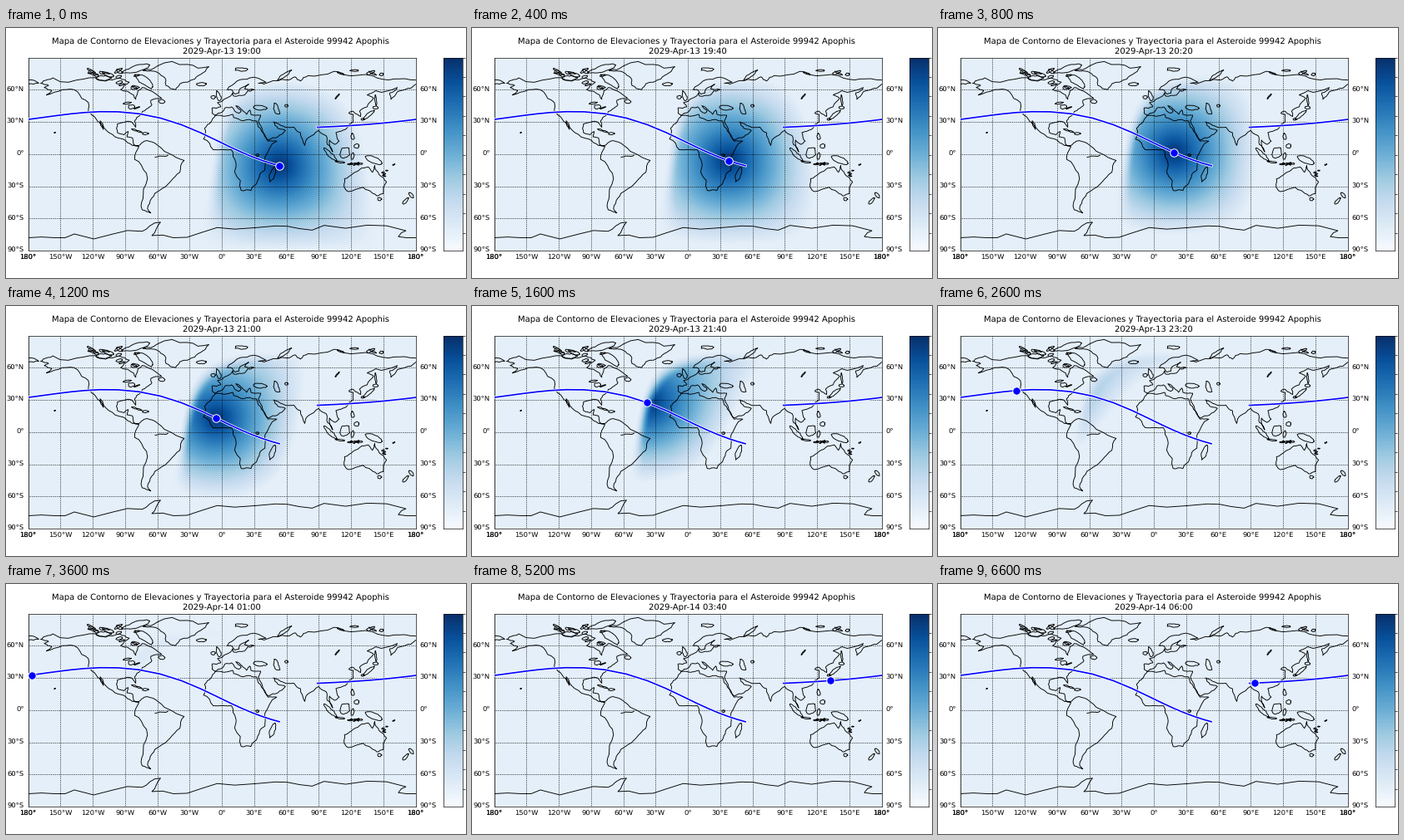
Recreate the animation shown at these times as a matplotlib script. Size 552 px wide and 301 px high, loop 6800 ms.

```python
import numpy as np
import matplotlib.pyplot as plt
from matplotlib.animation import FuncAnimation

W, H, DPI = 552, 301, 60
FRAMES, INTERVAL = 34, 200
CLOSEST = 2.77      # hours after 19:00
TILT = np.radians(39.6)
SUN_DECL = 9.2
BASE = 0.09         # shade where nothing is visible

plt.rcParams.update({"font.family": "DejaVu Sans", "text.hinting": "no_hinting"})
rng = np.random.default_rng(4)
fig = plt.figure(figsize=(W / DPI, H / DPI), dpi=DPI, facecolor="white")


def pixel_axes(left, top, right, bottom):
    axes = fig.add_axes([left / W, 1 - bottom / H,
                         (right - left) / W, (bottom - top) / H])
    axes.set_xticks([])
    axes.set_yticks([])
    return axes


ax = pixel_axes(26.5, 35.5, 491.5, 268)


def shore(*points, rounds=2):
    """Draw a coast through key points, crinkled by midpoint displacement."""
    p = np.array(points, float)
    for _ in range(rounds):
        step = np.diff(p, axis=0)
        middle = p[:-1] + step / 2
        middle += rng.uniform(-0.13, 0.13, (len(step), 1)) * step[:, ::-1] * [1, -1]
        p = np.insert(p, np.arange(1, len(p)), middle, axis=0)
    ax.plot(*p.T, color="black", lw=1.1, zorder=3)


def island(lon, lat, length, width, angle=0):
    """Draw a ragged ellipse."""
    a = np.linspace(0, 2 * np.pi, 11)
    r = rng.uniform(0.8, 1.15, 11) / 2
    r[-1] = r[0]
    x, y = length * r * np.cos(a), width * r * np.sin(a)
    c, s = np.cos(np.radians(angle)), np.sin(np.radians(angle))
    shore(*zip(lon + c * x - s * y, lat + s * x + c * y), rounds=1)


def islets(count, lons, lats, size):
    for _ in range(count):
        island(rng.uniform(*lons), rng.uniform(*lats),
               size * rng.uniform(0.6, 1.4), size * rng.uniform(0.2, 0.5),
               rng.uniform(-30, 30))


# Americas, clockwise from the Bering Strait
shore((-168, 66), (-166, 68), (-157, 71), (-128, 70), (-108, 68), (-95, 71),
      (-86, 67), (-94, 60), (-82, 55), (-80, 51), (-78, 59), (-74, 62), (-66, 59),
      (-56, 52), (-66, 50), (-65, 46), (-70, 42), (-76, 36), (-81, 31), (-80, 25),
      (-84, 30), (-97, 28), (-97, 20), (-91, 18), (-87, 21), (-88, 16), (-83, 15),
      (-82, 9), (-77, 8), (-72, 12), (-62, 10), (-50, 1), (-35, -6), (-39, -17),
      (-48, -26), (-58, -34), (-65, -41), (-69, -51), (-66, -55), (-74, -52),
      (-73, -38), (-70, -18), (-81, -5), (-77, 7), (-83, 8), (-92, 14), (-105, 20),
      (-113, 31), (-110, 23), (-117, 33), (-124, 40), (-124, 48), (-134, 58),
      (-148, 60), (-163, 55), (-158, 59), (-165, 62), (-161, 64), (-168, 66))
shore((-50, -1), (-56, -2), (-62, -3))
shore((-73, 78), (-60, 82), (-32, 83.5), (-12, 81.5), (-20, 74), (-25, 70),
      (-39, 65.5), (-43, 60), (-52, 64), (-52, 69), (-58, 75), (-73, 78))
# Africa
shore((-6, 36), (10, 37), (11, 34), (20, 31), (32, 31), (37, 21), (43, 12),
      (51, 12), (40, -3), (40, -15), (35, -20), (32, -28), (27, -34), (18, -34),
      (12, -17), (13, -8), (9, 4), (-8, 4), (-17, 14), (-16, 24), (-10, 30), (-6, 36))
# Europe and the Siberian coast
shore((36, 36), (27, 37), (26, 41), (23, 37), (19, 41), (13, 45), (18, 40),
      (16, 38), (9, 44), (3, 43), (0, 39), (-6, 36), (-9, 38), (-9, 43), (-1, 44),
      (-4, 48), (4, 52), (8, 54), (10, 57), (11, 54), (21, 55), (24, 59), (30, 60),
      (21, 61), (25, 65), (17, 61), (16, 57), (12, 56), (10, 59), (5, 60), (14, 68),
      (26, 71), (41, 67), (34, 66), (44, 67), (60, 69), (68, 72), (73, 68), (80, 73),
      (104, 77), (113, 74), (140, 73), (160, 70), (180, 69))
shore((-180, 69), (-170, 66), (-180, 65))
# Asia from the Pacific to the Mediterranean
shore((180, 65), (170, 60), (163, 58), (157, 51), (156, 57), (163, 62), (143, 59),
      (135, 55), (141, 52), (135, 44), (128, 40), (129, 35), (126, 37), (121, 40),
      (118, 38), (122, 37), (122, 30), (115, 23), (106, 20), (109, 12), (105, 9),
      (100, 13), (103, 2), (98, 9), (97, 17), (90, 22), (80, 15), (77, 8), (73, 20),
      (67, 25), (57, 26), (48, 30), (52, 24), (59, 22), (52, 16), (43, 13), (35, 28),
      (34, 31), (36, 36))
# Australia and Antarctica
shore((142, -11), (146, -19), (153, -26), (150, -37), (144, -39), (137, -34),
      (131, -31), (118, -35), (115, -33), (114, -23), (122, -18), (130, -13),
      (136, -12), (140, -17), (142, -11))
shore((-180, -78), (-155, -78), (-137, -74.5), (-101, -74.5), (-74, -72), (-67, -67),
      (-57, -63.5), (-61, -70), (-65, -76), (-45, -78), (-20, -73.5), (12, -70),
      (50, -67), (72, -69.5), (95, -66.5), (135, -66.3), (171, -71.5), (164, -77),
      (180, -78), rounds=1)

# Islands and lakes: centre, length, width, tilt
for place in [
        (-72, 68, 22, 7, -35), (-110, 71, 14, 5), (-80, 79.5, 26, 6, 15),
        (-56, 49, 6, 4), (-79, 21.7, 11, 1.5, -18), (-71, 19, 6, 2),
        (-19, 65, 10, 3), (-3, 54, 9, 4, 110), (-8, 53, 4, 3), (18, 79, 12, 3),
        (58, 73.5, 15, 3, 35), (143, 50, 9, 1.5, 95), (136, 36, 14, 3, 40),
        (131, 32.5, 3, 2), (143, 43.4, 5, 3), (121.5, 16, 6, 3, 100),
        (125, 7.5, 5, 4), (100.5, 0, 16, 4, -45), (110, -7.5, 9, 1.6, -8),
        (114, 1, 11, 9, 50), (121.5, -2, 7, 3, 80), (141, -5.5, 20, 6, -22),
        (47, -19, 14, 5, 70), (146.5, -42, 3.5, 3), (176, -38.5, 6, 3, 130),
        (170.5, -44, 8, 3, 45)]:
    island(*place)
for place in [(35, 43.3, 14, 4.5, -5), (51, 41.5, 11, 5, 110), (60, 45, 3, 2.5),
              (33, -1, 2.5, 2.5), (107, 53.5, 6, 1, 50), (-88, 47.5, 7, 2, 10),
              (-84, 44, 6, 4), (-79, 43, 5, 1, 20)]:
    island(*place)
islets(9, (-122, -88), (73, 78), 7)
islets(6, (-96, -76), (61, 75), 6)
islets(5, (95, 150), (74, 80), 6)
islets(7, (116, 130), (-10, -8), 3)
islets(5, (148, 168), (-21, -4), 2.5)
islets(1, (-156, -155), (19, 20), 1)

# Graticule; the labels at 180 overprint each other
grid = dict(color="black", lw=1, dashes=[1, 1], alpha=0.8, zorder=4)
for lat in range(-90, 90, 30):
    ax.plot([-180, 180], [lat, lat], **grid)
    name = f"{abs(lat)}°" + ("N" if lat > 0 else "S" if lat < 0 else "")
    ax.text(-183.6, lat, name, ha="right", va="center")
    ax.text(183.6, lat, name, ha="left", va="center")
for lon in range(-180, 181, 30):
    ax.plot([lon, lon], [-90, 90], **grid)
    edge = abs(lon) == 180
    name = f"{abs(lon)}°" + ("" if edge or lon == 0 else "E" if lon > 0 else "W")
    for _ in range(1 + edge):
        ax.text(lon, -93.8, name, ha="center", va="top")

# Colour scale
bar = pixel_axes(524.5, 35.5, 547.5, 268)
bar.imshow(np.linspace(0, 1, 99)[:, None], cmap="Blues", origin="lower",
           aspect="auto", extent=(0, 1, 0, 99), interpolation="nearest")
bar.yaxis.tick_right()
bar.set_yticks(range(9, 100, 10), labels=[])

# Ground track every 20 minutes: a tilted great circle over the turning Earth
hours = np.arange(FRAMES + 1) / 3
u = np.radians(50.5) + 1.1 * np.arctan((hours - CLOSEST) / 1.5)
track_lat = np.degrees(np.arcsin(np.sin(TILT) * np.sin(u)))
track_lon = (40 - 14.6 * hours
             - np.degrees(np.arctan2(np.cos(TILT) * np.sin(u), np.cos(u))))
for color, width, z in (("white", 3.8, 5), ("blue", 2, 6)):
    for shift in (0, 360):
        ax.plot(track_lon + shift, track_lat, color=color, lw=width, zorder=z)

glon, glat = np.meshgrid(np.arange(-179, 180, 2), np.arange(-89, 90, 2))


def sin_height(lon, lat):
    """Sine of the height of a body that stands above lon, lat."""
    a, b = np.radians(glat), np.radians(lat)
    return (np.sin(a) * np.sin(b)
            + np.cos(a) * np.cos(b) * np.cos(np.radians(glon - lon)))


def visibility(k):
    """Elevation of the asteroid where the sky is dark, scaled to the colours."""
    t = hours[k]
    s = sin_height(track_lon[k], track_lat[k])
    parallax = 6371 / np.hypot(38000, 25000 * (t - CLOSEST))
    elev = np.degrees(np.arctan2(s - parallax, np.sqrt(np.maximum(1 - s * s, 0))))
    sun = np.degrees(np.arcsin(sin_height(-105 - 15 * t, SUN_DECL)))
    dark = np.clip((-5 - sun) / 12, 0, 1)
    dark = dark * dark * (3 - 2 * dark)
    return BASE + (1 - BASE) * np.maximum(elev - 6, 0) / 84 * dark


shade = ax.imshow(visibility(0), cmap="Blues", vmin=0, vmax=1, origin="lower",
                  extent=(-180, 180, -90, 90), aspect="auto",
                  interpolation="bilinear", zorder=1)
dot, = ax.plot([], [], "o", color="blue", ms=11.4, mec="white", mew=1.2, zorder=7)
title = ax.set_title("")
ax.set_xlim(-180, 180)
ax.set_ylim(-90, 90)


def update(k):
    day, minutes = divmod(19 * 60 + 20 * k, 24 * 60)
    title.set_text("Mapa de Contorno de Elevaciones y Trayectoria para el "
                   "Asteroide 99942 Apophis \n"
                   f"2029-Apr-{13 + day} {minutes // 60:02d}:{minutes % 60:02d}")
    shade.set_data(visibility(k))
    dot.set_data([(track_lon[k] + 180) % 360 - 180], [track_lat[k]])
    return shade, dot, title


anim = FuncAnimation(fig, update, frames=FRAMES, interval=INTERVAL,
                     repeat=True, repeat_delay=0)
plt.show()
```
